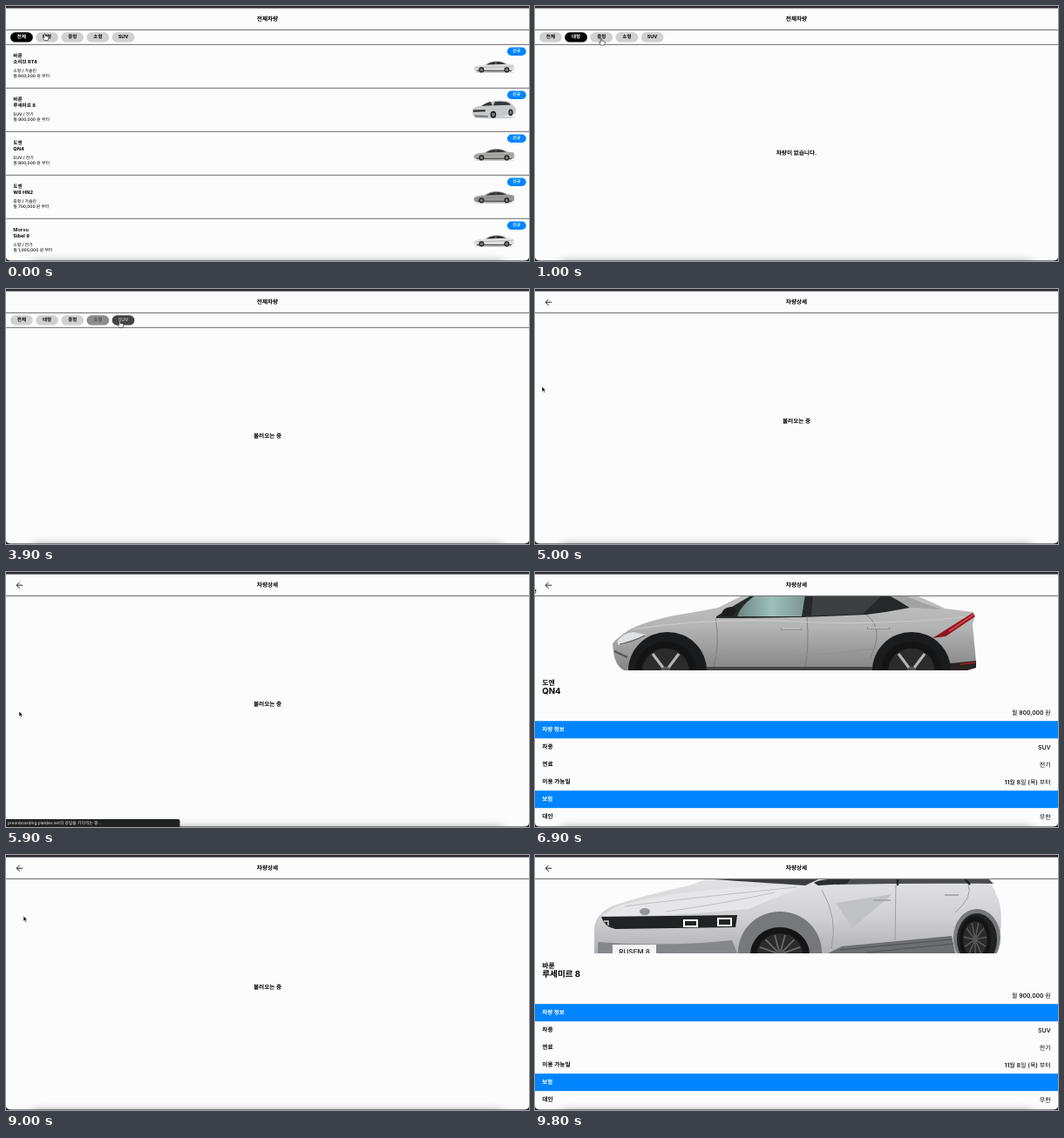
Write an HTML page that moves like this. It is 600 px wide and 293 px high and loops after 9.9 s.

```html
<!DOCTYPE html>
<html>
<head>
<meta charset="utf-8">
<style>
html, body { margin: 0; height: 100%; overflow: hidden; background: #fcfcfc; }
svg { display: block; width: 100vw; height: 100vh; text-rendering: geometricPrecision;
  font-family: Inter, "Noto Sans CJK KR", "Noto Sans CJK", sans-serif; }
text { dominant-baseline: central; }
</style>
</head>
<body>
<svg viewBox="0 0 600 293">
  <defs>
    <filter id="blur" x="-10%" y="-300%" width="120%" height="700%"><feGaussianBlur stdDeviation="6"/></filter>
    <linearGradient id="silver" x2="0" y2="1">
      <stop stop-color="#c2c2c2"/><stop offset=".45" stop-color="#b4b4b4"/><stop offset="1" stop-color="#858585"/>
    </linearGradient>
    <linearGradient id="white" x2="0" y2="1">
      <stop stop-color="#e4e4e7"/><stop offset=".55" stop-color="#cfcfd3"/><stop offset="1" stop-color="#b0b0b5"/>
    </linearGradient>
    <linearGradient id="glass">
      <stop stop-color="#6d8482"/><stop offset=".5" stop-color="#9cc0bb"/><stop offset="1" stop-color="#7d9693"/>
    </linearGradient>
    <clipPath id="photo"><path d="M0 28H600V113H0Z"/></clipPath>
  </defs>
  <rect width="600" height="293" fill="#fcfcfc"/>
  <g id="page"></g>
  <rect x="30" y="295" width="540" height="14" fill="#000" opacity=".45" filter="url(#blur)"/>
  <path d="M0 288V293H600V288Q600 292.4 595 292.4H5Q0 292.4 0 288Z" fill="#222"/>
  <rect width="600" height="2.6" fill="#2e2a33"/>
  <g id="status"></g>
  <g id="cursor" stroke="#fff" stroke-width=".6" stroke-linejoin="round">
    <path id="arrow" d="M0 0V6.2L1.5 4.9L2.5 7.2L3.6 6.7L2.6 4.5H4.5Z" fill="#000"/>
    <path id="hand" d="M-.7 .6Q0-.5 .7 .6V3L3.6 3.6Q4.6 4 4.4 5.2L3.6 8H-.4L-2.3 5.2Q-2.6 4.2-1.6 4.3L-.7 5Z"
      fill="#fff" stroke="#111"/>
  </g>
</svg>
<script>
const $ = id => document.getElementById(id);
const LOOP = 9900, BLUE = '#0085ff';
const pills = ['전체', '대형', '중형', '소형', 'SUV'];
const cars = [
  { brand: '바룬', name: '소리브 RT4', kind: '소형', fuel: '가솔린', price: '600,000', paint: '#dededd', top: 18 },
  { brand: '바룬', name: '루세미르 8', kind: 'SUV', fuel: '전기', price: '900,000', paint: '#c6c9cc', top: 14, tall: true },
  { brand: '도엔', name: 'QN4', kind: 'SUV', fuel: '전기', price: '800,000', paint: '#aaaba8', top: 19 },
  { brand: '도엔', name: 'W8 HN2', kind: '중형', fuel: '가솔린', price: '700,000', paint: '#999a97', top: 18 },
  { brand: 'Morvu', name: 'Sibel 9', kind: '소형', fuel: '전기', price: '1,000,000', paint: '#e2e2e2', top: 18 }
];
const ALL = [0, 1, 2, 3, 4];

// start, view, selected pill, cars shown
const scenes = [
  [0, 'list', 0, ALL],
  [200, 'load', 1], [600, 'empty', 1],
  [1400, 'load', 2], [1700, 'list', 2, [3]],
  [2700, 'load', 3], [3100, 'list', 3, [0, 4]],
  [3800, 'load', 4], [4200, 'list', 4, [1, 2]],
  [5000, 'wait'], [6200, 'detail', 0, [2]],
  [7200, 'load', 0], [7600, 'list', 0, ALL],
  [8200, 'load', 4], [8500, 'list', 4, [1, 2]],
  [9000, 'wait'], [9600, 'detail', 0, [1]]
];
// time, x, y
const moves = [
  [0, 44.5, 31.5], [700, 44.5, 31.5], [1000, 76, 37], [2200, 76, 37], [2500, 106, 37.5],
  [3300, 106, 37.5], [3700, 130.5, 36.5], [4300, 130.5, 36.5], [4800, 8, 112], [5000, 8, 112],
  [5900, 15, 160], [6200, 15, 160], [6900, -2, 17.5], [7100, -2, 17.5], [7200, 14, 14],
  [7400, 14, 14], [8000, 134, 33], [8500, 134, 33], [8800, 20, 70], [9000, 20, 70],
  [9700, -10, 75], [LOOP, -10, 75]
];

const clamp = v => Math.max(0, Math.min(1, v));
const smooth = v => v * v * (3 - 2 * v);
const gray = v => { v = Math.round(v); return `rgb(${v},${v},${v})`; };
const text = (x, y, size, weight, str, anchor = 'start', fill = '#000') =>
  `<text x="${x}" y="${y}" font-size="${size}" font-weight="${weight}" text-anchor="${anchor}" fill="${fill}">${str}</text>`;
const mid = (y, str) => text(300, y, 6.65, 700, str, 'middle');
const line = y => `<path d="M0 ${y}H600" stroke="#444" stroke-width=".8"/>`;
const shape = (d, fill) => `<path d="${d}" fill="${fill}"/>`;
const stroke = (d, color, w) => `<path d="${d}" fill="none" stroke="${color}" stroke-width="${w}"/>`;
const oval = (x, y, rx, ry, fill) => `<ellipse cx="${x}" cy="${y}" rx="${rx}" ry="${ry}" fill="${fill}"/>`;
const header = title => mid(15, title) + line(27.4);

function wheel(x, y, rx, ry, spokes, color, width) {
  let s = oval(x, y, rx, ry, '#141414') + oval(x, y, rx * .77, ry * .77, '#2b2b2c');
  for (let i = 0; i < spokes; i++) {
    const a = (i + .5) * 2 * Math.PI / spokes - Math.PI / 2;
    s += stroke(`M${x} ${y}l${Math.cos(a) * rx * .73} ${Math.sin(a) * ry * .73}`, color, width);
  }
  return s + oval(x, y, rx * .16, ry * .16, '#555');
}

function thumb(car) {
  const small = (x, y, rx, ry) => oval(x, y, rx, ry, '#1c1c1c') + oval(x, y, rx * .6, ry * .6, '#77787a');
  if (car.tall) return oval(25, 19.5, 24, 1.5, '#ccc') +
    shape('M0 13Q0 9 4 7.5L14 6Q20 1 27 .5Q38-.5 43 2.5L49 8Q51 12 49 16L27 19.5H4Q0 18.5 0 13Z', car.paint) +
    shape('M10 6.8Q17 2.2 21 1.8L23 6Z', '#333') +
    shape('M24 6L26 1.8Q37 .7 42 3.2L44 5.5Z', '#33363a') +
    shape('M1 11.2L15 11V13L1 13.4Z', '#2a2a2a') + shape('M2 17L18 17.6V19.4H4Z', '#77797b') +
    small(24, 16.5, 3.3, 4) + small(44, 14, 2.6, 3.9);
  return oval(23.5, 13.8, 23, 1, '#ccc') +
    shape('M0 9.5Q1 6.5 7 5.8L13 5Q18 1 24 .7Q33 0 39 4.3L46 5.3Q47.5 8 46.5 11.5L44 12.7H3Q0 12.5 0 9.5Z', car.paint) +
    shape('M14 5.2Q19 1.8 24 1.6Q32 1.2 37 4.5Z', '#2f3234') +
    stroke('M25.5 1.5V5', car.paint, .6) + stroke('M2 8.6L45 7.2', '#777', .4) +
    shape('M3 11.4H44L43 12.9H4Z', '#555') + small(9, 11, 3, 3.1) + small(38, 11, 3, 3.1);
}

const sidePhoto = () =>
  shape('M102 113Q92 108 90 92L89 82Q94 76 107 67Q125 57 160 50Q195 44 210 41L248 22H425Q455 34 470 42L503 46Q506 50 502 60L506 103Q506 110 496 113Z', 'url(#silver)') +
  shape('M208 51Q232 36 250 26H406L430 41Q405 46 380 49Q300 53 208 53Z', '#26292a') +
  shape('M232 51Q236 38 254 26H310L306 51Z', 'url(#glass)') +
  shape('M319 27H398L376 48L317 50Z', '#3d4041') +
  shape('M406 27H424Q445 36 466 43L432 41Z', '#a2a2a2') +
  stroke('M207 53Q213 80 204 113M312 51Q315 90 309 113M380 49Q402 66 384 100', '#777', .8) +
  stroke('M112 66Q200 52 300 57T500 51', '#cacaca', 1.2) + stroke('M204 96Q300 101 388 88', '#939393', 2) +
  stroke('M282 65.5H306M381 64.5H407', '#888', 2.6) + stroke('M283 65H305M382 64H406', '#c8c8c8', 1.4) +
  shape('M214 50Q214 41 225 40Q231 41 231 46L225 51Z', '#1c1c1c') +
  shape('M94 80Q101 70 113 69L127 72Q114 80 96 84Z', '#dfe2e4') + stroke('M97 83Q112 80 126 73', '#555', 1.2) +
  stroke('M91 91L106 98', '#555', 2) +
  shape('M456 76L502 47L505 51L471 74Z', '#8f1620') + stroke('M475 68L503 49', '#e0444c', 1.6) +
  shape('M476 105L506 102V110L496 113H476Z', '#2a2324') + stroke('M488 106L505 104', '#a51c26', 1.5) +
  shape('M194 109H390V113H194Z', '#444') +
  oval(152, 113, 45, 44, '#1a1b1c') + oval(432, 113, 45, 44, '#1a1b1c') +
  wheel(150, 114, 35, 34, 5, '#b4b4b4', 3.2) + wheel(432, 114, 35, 34, 5, '#b4b4b4', 3.2);

const frontPhoto = () =>
  shape('M68 113V85Q69 67 90 58Q130 45 177 35L205 24H505Q528 32 529 46Q537 58 534 88L528 108L518 113Z', 'url(#white)') +
  shape('M93 59Q180 35 310 35L245 62Q150 71 77 70Z', '#e6e6e9') +
  stroke('M103 59Q180 49 300 37M150 65Q210 57 275 43', '#bfc0c4', 1) +
  shape('M205 28H325L310 35Q250 31 205 28Z', '#3a3c3e') +
  shape('M345 27H520L526 33Q440 32 345 34Z', '#4a4c4f') +
  stroke('M416 27V35M493 27L499 34', '#202224', 2.5) +
  shape('M320 32Q326 27 362 27L358 33L325 35Z', '#2b2c2e') +
  stroke('M329 40Q348 72 340 108M414 34L413 98M497 34Q503 48 482 66', '#909297', .8) +
  shape('M345 55L410 45L364 84Z', '#c1c2c6') + stroke('M388 52H408M470 46H486', '#9a9da1', 1.6) +
  shape('M76 71L232 69L230 83L92 85Q80 83 76 71Z', '#202225') +
  stroke('M171 75H186V82H171ZM210 73H225V81H210Z', '#fff', 2) + stroke('M79 76H84V81', '#ddd', 1.4) +
  shape('M72 100Q150 106 226 98L232 113H72Z', '#85878b') +
  shape('M336 113L352 105L478 93L482 113Z', '#6d6e72') +
  stroke('M350 109L478 97M380 112L480 102', '#515256', 1.2) +
  oval(126, 65, 6, 4, '#93969a') +
  shape('M89 103H139V113H89Z', '#f4f4f4') + text(114, 111, 8, 600, 'RUSEM 8', 'middle', '#333') +
  oval(281, 112, 48, 47, '#77787b') + oval(507, 95, 27, 33, '#77787b') + oval(507, 97, 23, 30, '#202122') +
  wheel(281, 114, 34, 31, 13, '#6b6b6d', 1.8) + wheel(505, 97, 18, 27, 11, '#5c5c5e', 1.4);

function detail(car) {
  const pair = (y, key, value) => text(8.3, y, 6.7, 700, key) + text(591.7, y, 7, 500, value, 'end');
  const bar = (y, str) => `<rect y="${y - 10.2}" width="600" height="20" fill="${BLUE}"/>` +
    text(8.3, y, 6.5, 700, str, 'start', '#fff');
  return `<g clip-path="url(#photo)">${car.tall ? frontPhoto() : sidePhoto()}</g>` +
    text(8.3, 126.5, 7.9, 600, car.brand) + text(8.3, 137.7, 9.6, 700, car.name) +
    text(591.7, 161.3, 6.9, 500, `월 ${car.price} 원`, 'end') +
    bar(181.4, '차량 정보') + pair(201.4, '차종', car.kind) + pair(221.4, '연료', car.fuel) +
    pair(241.4, '이용 가능일', '11월 8일 (목) 부터') + bar(261.4, '보험') + pair(281.4, '대인', '무한');
}

function row(car, i) {
  const y = 44.3 + i * 50;
  return `<g transform="translate(0 ${y})">` +
    text(8.3, 13.6, 5.6, 600, car.brand) + text(8.3, 20.7, 5.6, 700, car.name) +
    text(8.3, 30.7, 4.85, 500, `${car.kind} / ${car.fuel}`) +
    text(8.3, 36.7, 4.85, 500, `월 ${car.price} 원 부터`) +
    `<g transform="translate(${car.tall ? 535 : 536.5} ${car.top})">${thumb(car)}</g>` +
    `<rect x="575" y="3.3" width="21.7" height="9.4" rx="4.7" fill="${BLUE}"/>` +
    text(585.8, 8, 4.9, 600, '신규', 'middle', '#fff') + '</g>' + line(y + 50);
}

function filters(sel, prev, p) {
  return pills.map((label, i) => {
    const on = i === sel ? p : i === prev ? 1 - p : 0, x = 5 + i * 29.17;
    return `<rect x="${x}" y="30.3" width="25.8" height="11.3" rx="5.65" fill="${gray(208 * (1 - on))}"/>` +
      text(x + 12.9, 36, 5.5, 700, label, 'middle', gray(255 * on));
  }).join('') + line(44.3);
}

function page(t, i) {
  const [start, view, sel, shown] = scenes[i];
  if (view === 'wait' || view === 'detail')
    return header('차량상세') + stroke('M19.2 15.2H12.2M15.7 11.7L12.2 15.2L15.7 18.7', '#111', .9) +
      (view === 'wait' ? mid(152, '불러오는 중') : detail(cars[shown[0]]));
  const before = scenes[i - 1], fades = view === 'load' && before[1] !== 'detail';
  const p = fades ? clamp((t - start) / 150) : 1;
  const scroll = t >= 7900 && t < 8200 ? 1.8 * clamp((t - 7900) / 100) : 0;
  const body = view === 'list' ? shown.map((n, k) => row(cars[n], k)).join('')
    : mid(168.5, view === 'load' ? '불러오는 중' : '차량이 없습니다.');
  return `<g transform="translate(0 ${-scroll})">${header('전체차량')}${filters(sel, fades ? before[2] : -1, p)}${body}</g>`;
}

$('status').innerHTML = shape('M0 284H197.5Q199.5 284 199.5 286V293H0Z', '#202221') +
  text(2, 288.6, 4.8, 400, 'preonboarding.platdev.net의 응답을 기다리는 중...', 'start', '#eee');

let last = '';
function draw(now) {
  const t = now % LOOP;
  const i = scenes.findLastIndex(s => s[0] <= t), view = scenes[i][1];
  const html = page(t, i);
  if (html !== last) $('page').innerHTML = last = html;
  $('status').style.opacity = t < 6200 ? clamp((t - 5300) / 200) : 0;

  const k = moves.findLastIndex(m => m[0] <= t), [t0, x0, y0] = moves[k], [t1, x1, y1] = moves[k + 1];
  const p = smooth((t - t0) / (t1 - t0)), onPage = view === 'wait' || view === 'detail';
  $('cursor').setAttribute('transform', `translate(${x0 + (x1 - x0) * p} ${y0 + (y1 - y0) * p})`);
  $('arrow').style.display = onPage ? '' : 'none';
  $('hand').style.display = onPage ? 'none' : '';
  requestAnimationFrame(() => draw(performance.now() - begin));
}
const begin = performance.now();
draw(0);
</script>
</body>
</html>
```
